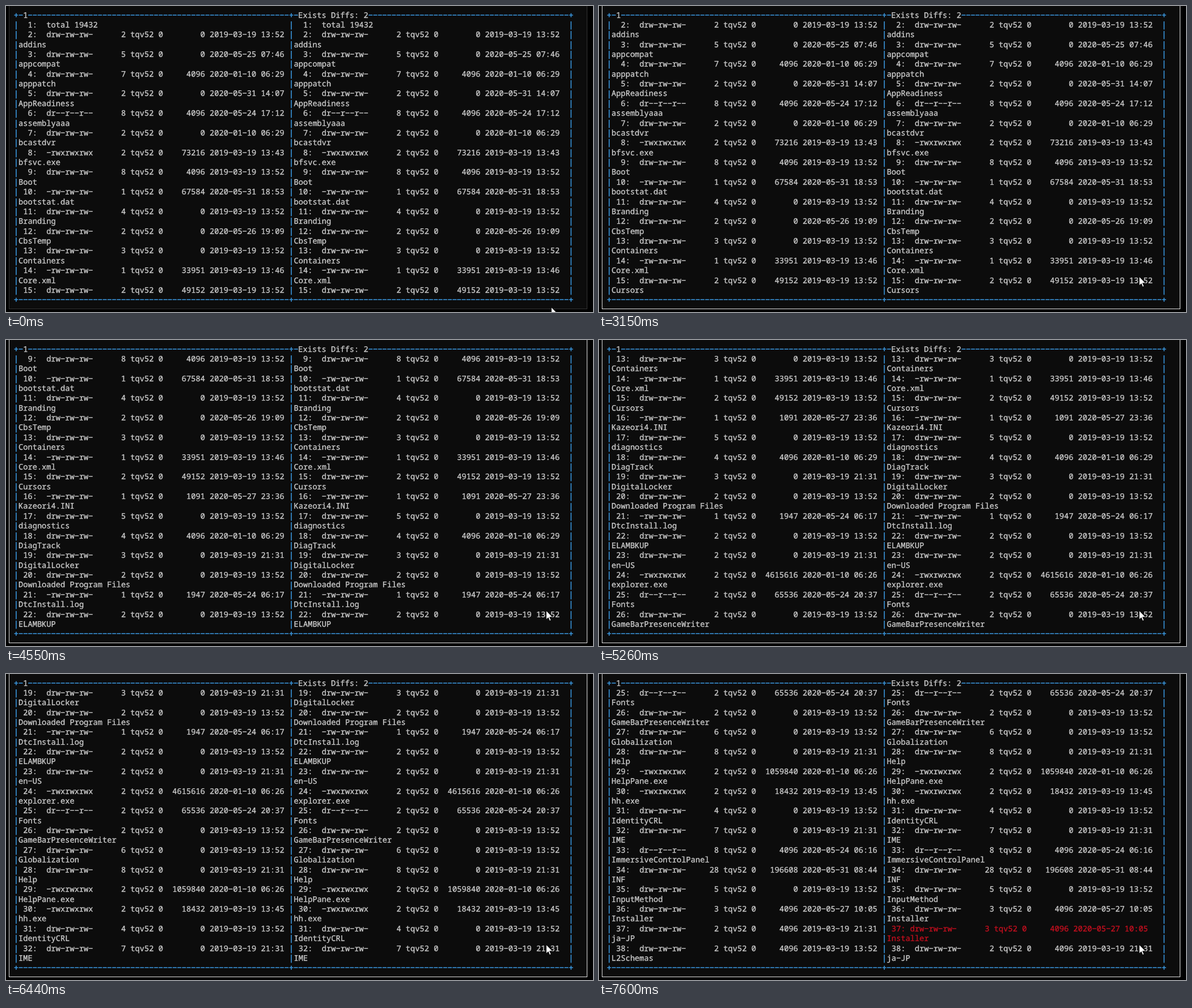
These frames come from a looping animation (1035 by 541 pixels, 8 s). An HTML page:

```html
<!DOCTYPE html>
<html lang="en">
<head>
<meta charset="utf-8">
<title>Directory diff</title>
<style>
  html, body { margin: 0; width: 100%; height: 100%; overflow: hidden; background: #000; }
  #stage { position: relative; width: 1035px; height: 541px; overflow: hidden; }
  #pane {
    position: absolute; left: 5px; top: -2px; width: 1020px; height: 538px;
    box-sizing: border-box; border: 1px solid #333; background: #0c0c0c;
  }
  #pane.active { border-color: #e6e6e6; }
  pre {
    position: absolute; margin: 0; color: #ccc;
    font: 13.715px/17.37px "Noto Sans Mono", "DejaVu Sans Mono", monospace;
    font-variant-ligatures: none; text-rendering: geometricPrecision;
    -webkit-text-stroke: .35px;
  }
  #grid { left: 13.8px; top: 7.5px; color: #3a96dd; -webkit-text-stroke-width: .6px; }
  #grid span { color: #ccc; -webkit-text-stroke: .35px #ccc; }
  #left, #right { top: 24.87px; }
  #left { left: 22px; }
  #right { left: 507.5px; }
  .added { color: #c50f1f; -webkit-text-stroke-color: #c50f1f; }
  #pointer { position: absolute; left: 0; top: 0; }
</style>
</head>
<body>
<div id="stage">
  <div id="pane"></div>
  <pre id="grid"></pre>
  <pre id="left"></pre>
  <pre id="right"></pre>
  <svg id="pointer" width="14" height="21">
    <path d="M.5 .5V16.2L4.1 12.8L6.6 18.6L9 17.5L6.5 11.9H11.6Z" fill="#fff" stroke="#000" stroke-width=".8"/>
  </svg>
</div>
<script>
const LOOP = 8000, ROWS = 28, USER = 'tqv52';
const MODES = { d: 'drw-rw-rw-', r: 'dr--r--r--', f: '-rw-rw-rw-', x: '-rwxrwxrwx' };

// mode, links, size, date, time, name
const files = `d 2 0 2019-03-19 13:52 addins
d 5 0 2020-05-25 07:46 appcompat
d 7 4096 2020-01-10 06:29 apppatch
d 2 0 2020-05-31 14:07 AppReadiness
r 8 4096 2020-05-24 17:12 assemblyaaa
d 2 0 2020-01-10 06:29 bcastdvr
x 2 73216 2019-03-19 13:43 bfsvc.exe
d 8 4096 2019-03-19 13:52 Boot
f 1 67584 2020-05-31 18:53 bootstat.dat
d 4 0 2019-03-19 13:52 Branding
d 2 0 2020-05-26 19:09 CbsTemp
d 3 0 2019-03-19 13:52 Containers
f 1 33951 2019-03-19 13:46 Core.xml
d 2 49152 2019-03-19 13:52 Cursors
f 1 1091 2020-05-27 23:36 Kazeori4.INI
d 5 0 2019-03-19 13:52 diagnostics
d 4 4096 2020-01-10 06:29 DiagTrack
d 3 0 2019-03-19 21:31 DigitalLocker
d 2 0 2019-03-19 13:52 Downloaded Program Files
f 1 1947 2020-05-24 06:17 DtcInstall.log
d 2 0 2019-03-19 13:52 ELAMBKUP
d 2 0 2019-03-19 21:31 en-US
x 2 4615616 2020-01-10 06:26 explorer.exe
r 2 65536 2020-05-24 20:37 Fonts
d 2 0 2019-03-19 13:52 GameBarPresenceWriter
d 6 0 2019-03-19 13:52 Globalization
d 8 0 2019-03-19 21:31 Help
x 2 1059840 2020-01-10 06:26 HelpPane.exe
x 2 18432 2019-03-19 13:45 hh.exe
d 4 0 2019-03-19 13:52 IdentityCRL
d 7 0 2019-03-19 21:31 IME
r 8 4096 2020-05-24 06:16 ImmersiveControlPanel
d 28 196608 2020-05-31 08:44 INF
d 5 0 2019-03-19 13:52 InputMethod
d 3 4096 2020-05-27 10:05 Installer
d 2 4096 2019-03-19 21:31 ja-JP
d 2 4096 2019-03-19 13:52 L2Schemas`.split('\n');

// The right side repeats one entry.
const ADDED = 35;
const changed = files.slice();
changed.splice(ADDED, 0, files[ADDED - 1]);

const scrollTimes = [
  3150, 3330, 3510, 3690, 3920, 4090,
  4320, 4550, 4710, 4890, 5080, 5260,
  5410, 5620, 5830, 6040, 6190, 6440,
  6650, 6810, 6970, 7200, 7400, 7600
];
const pointerStops = [
  [0, 961, 532], [70, 954, 508], [140, 946, 489], [200, 944, 481],
  [2220, 949, 478], [2310, 952, 478]
];
const FOCUS_AT = 2390;

const $ = id => document.getElementById(id);
// The minus sign gives the wide terminal dash.
const dashes = s => s.replace(/-/g, '\u2212');

function entry(file, i, added) {
  const [mode, links, size, date, time, ...name] = file.split(' ');
  const label = String(i + 2).padStart(3) + (added ? ': ' : ':  ');
  const info = MODES[mode] + links.padStart(7) + ` ${USER} 0` + size.padStart(9) + ` ${date} ${time}`;
  return [label + info, name.join(' ')].map(dashes)
    .map(row => added ? `<span class="added">${row}</span>` : row);
}

const column = (list, addedAt) =>
  [['  1:  total 19432'], ...list.map((file, i) => entry(file, i, i === addedAt))];

const columns = { left: column(files, -1), right: column(changed, ADDED) };

function drawGrid() {
  const rule = n => dashes('-'.repeat(n));
  const title = s => `<span>${s}</span>`;
  const head = '+' + rule(1) + title('1') + rule(56) + '+' + rule(1) +
    title('Exists Diffs: 2') + rule(43) + '+';
  const side = '|' + ' '.repeat(58) + '|' + ' '.repeat(59) + '|';
  const foot = '+' + rule(58) + '+' + rule(59) + '+';
  $('grid').innerHTML = [head, ...Array(ROWS).fill(side), foot].join('\n');
}

let shown = -1;
function showFrom(top) {
  if (top === shown) return;
  shown = top;
  for (const id in columns)
    $(id).innerHTML = columns[id].slice(top).flat().slice(0, ROWS).join('\n');
}

function render() {
  const t = performance.now() % LOOP;
  showFrom(scrollTimes.filter(s => s <= t).length);
  const [, x, y] = pointerStops.filter(p => p[0] <= t).pop();
  $('pointer').style.transform = `translate(${x}px, ${y}px)`;
  $('pane').classList.toggle('active', t >= FOCUS_AT);
  requestAnimationFrame(render);
}

drawGrid();
render();
</script>
</body>
</html>
```
